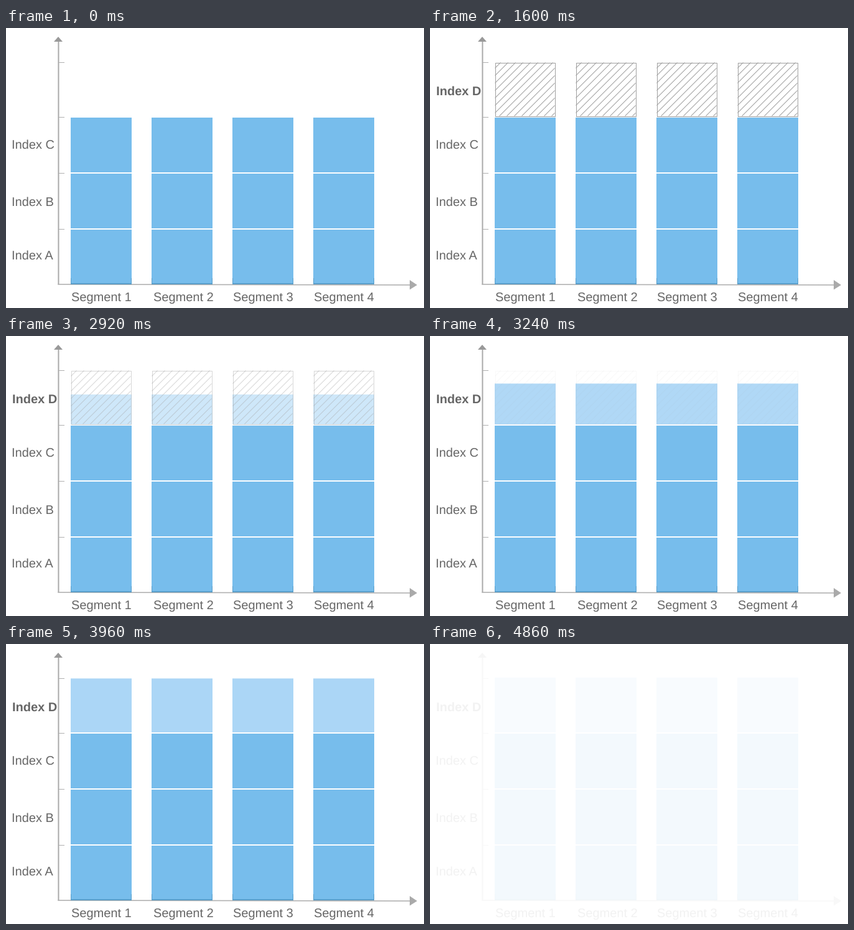
These frames come from a looping animation (672x450 px, 6.58 s). A matplotlib script:

```python
import matplotlib.pyplot as plt
import numpy as np
from matplotlib.animation import FuncAnimation
from matplotlib.collections import LineCollection
from matplotlib.patches import Polygon, Rectangle

W, H, DPI = 672, 450, 96
PX = 72 / DPI
LOOP_MS, STEP_MS = 6580, 20

BLUE, PALE, EDGE = "#77bdec", "#abd6f6", "#5a9fcb"
TEXT, HATCH, AXIS = "#666666", "#a0a0a0", "#b0b0b0"

BAR_X, BAR_W = (104, 234, 364, 494), 98
TOP, BASE = 54, 142
FADE_IN_STEPS = (0, 260, 400, 520, 640, 760, 860, 980, 1140, 1300, 1600)

plt.rcParams.update({
    "font.family": "Liberation Sans",
    "text.hinting": "none",
    "toolbar": "None",
})

fig = plt.figure(figsize=(W / DPI, H / DPI), dpi=DPI, facecolor="white")
ax = fig.add_axes([0, 0, 1, 1])
ax.set_xlim(0, W)
ax.set_ylim(H, 0)
ax.axis("off")


def rect(x0, y0, x1, y1, color, z=1, **kw):
    patch = Rectangle((x0, y0), x1 - x0, y1 - y0, fc=color, lw=0, zorder=z, **kw)
    return ax.add_patch(patch)


def label(x, y, text, **kw):
    return ax.text(x, y, text, size=20 * PX, color=TEXT, va="baseline", **kw)


def smooth(t, start, end):
    u = np.clip((t - start) / (end - start), 0, 1)
    return u * u * (3 - 2 * u)


def hatch_lines(x, y, w, h, gap=12):
    """Frame of a box and the rising diagonals inside it."""
    frame = [(x, y), (x + w, y), (x + w, y + h), (x, y + h), (x, y)]
    diagonals = [
        [(x + max(0, k - h), y + min(k, h)), (x + min(k, w), y + max(0, k - w))]
        for k in np.arange(gap * 0.75, w + h, gap)
    ]
    return [frame] + diagonals


# Axes with arrowheads and ticks
rect(83, 20, 84, 412, "#cccccc")
rect(84, 20, 85, 412, "#ababab")
rect(85, 20, 86, 412, "#d8d8d8")
ax.plot([84, 651], [412, 413], color=AXIS, lw=1.6 * PX, zorder=1)
ax.add_patch(Polygon([(84, 14), (91, 22), (77, 22)], fc="#999999", lw=0))
ax.add_patch(Polygon([(661, 413), (649, 420.5), (649, 405)], fc="#aaaaaa", lw=0))
for y in (55, 143, 233, 323):
    rect(85, y, 94, y + 1.4, AXIS)

# Stacked bars
for x in BAR_X:
    for y0, y1 in ((144, 232), (234, 322), (324, 411)):
        rect(x, y0, x + BAR_W, y1, BLUE, 2)
    rect(x, 410, x + BAR_W, 412, EDGE, 3)
    for tick in (x, x + BAR_W - 1):
        rect(tick, 402, tick + 1, 411, EDGE, 3)

for i, x in enumerate((105, 237, 365, 495), 1):
    label(x, 440, f"Segment {i}")
for y, name in ((372, "A"), (286, "B"), (194, "C")):
    label(9.3, y, f"Index {name}")

# Moving parts
new_label = label(9.7, 108, "Index D", weight="bold")
risers = [rect(x, BASE, x + BAR_W, BASE, PALE, 2, snap=False) for x in BAR_X]
hatching = ax.add_collection(LineCollection(
    [s for x in BAR_X for s in hatch_lines(x + 0.5, 55.5, 96, 86)],
    colors=HATCH, linewidths=PX, zorder=3))
veil = rect(0, 0, W, H, "white", 10)


def veil_alpha(t):
    if t < 4440:
        return 0
    held = 4860 if t >= 4860 else min(4800, t - (t - 4440) % 40)
    return (held - 4380) / 520


def update(frame):
    t = frame * STEP_MS
    shown = smooth(max(s for s in FADE_IN_STEPS if s <= t), 0, 1600)
    filled = smooth(t, 2320, 3400)
    left = 1 - np.clip((t - 2300) / 1900, 0, 1)
    height = (BASE - TOP) * (1 - left ** 2)

    new_label.set_alpha(shown)
    hatching.set_alpha(shown * (1 - filled))
    for bar in risers:
        bar.set_y(BASE - height)
        bar.set_height(height)
        bar.set_alpha(filled)
    veil.set_alpha(veil_alpha(t))
    return [new_label, hatching, veil, *risers]


anim = FuncAnimation(fig, update, frames=LOOP_MS // STEP_MS, interval=STEP_MS,
                     repeat=True, repeat_delay=0, blit=False)
plt.show()
```
